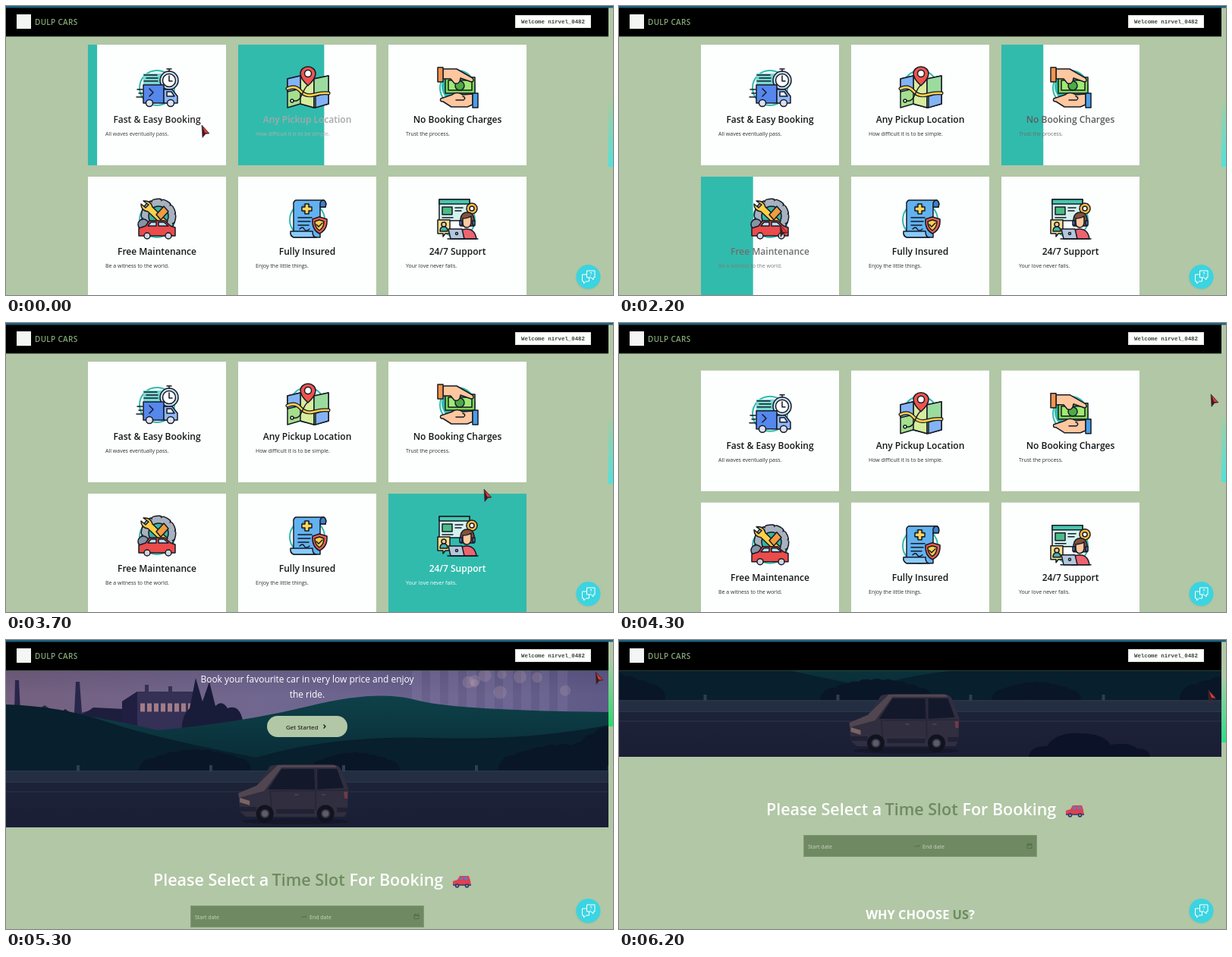
Write an HTML page that moves like this. It is 800x381 px and loops after 6.3 s.

```html
<!DOCTYPE html>
<html lang="en">
<head>
<meta charset="utf-8">
<title>Car rental page</title>
<style>
html, body { margin: 0; width: 100%; height: 100%; overflow: hidden; background: #b1c7a5; }
svg { display: block; }
text { font-family: "Open Sans", "Noto Sans", sans-serif; white-space: pre; }
.heading { font-size: 21.5px; font-weight: 600; }
.why { font-size: 16.4px; font-weight: 700; }
.title { font-size: 12px; font-weight: 600; text-anchor: middle; }
.small { font-size: 7px; }
.icon { stroke: #161a24; stroke-width: 1.5; stroke-linejoin: round; stroke-linecap: round; }
</style>
</head>
<body>
<svg id="stage" width="800" height="381" viewBox="0 0 800 381">
  <defs>
    <linearGradient id="sky"><stop stop-color="#75607f"/><stop offset=".45" stop-color="#706790"/><stop offset="1" stop-color="#5f5a87"/></linearGradient>
    <linearGradient id="dusk" x2="0" y2="1"><stop stop-color="#1e1c40"/><stop offset="1" stop-color="#1e1c40" stop-opacity="0"/></linearGradient>
    <linearGradient id="hill" x2="0" y2="1"><stop stop-color="#0e4149"/><stop offset="1" stop-color="#082833"/></linearGradient>
    <linearGradient id="road" x2="0" y2="1"><stop stop-color="#1c2437"/><stop offset="1" stop-color="#1b1e36"/></linearGradient>
    <linearGradient id="thumbFill" x2="0" y2="1"><stop stop-color="#a4cda3"/><stop id="thumbEnd" offset="1"/></linearGradient>
    <clipPath id="bannerClip"><path d="M0-260H794V154H0z"/></clipPath>
  </defs>
  <rect width="800" height="381" fill="#b1c7a5"/>

  <g id="page">
    <g clip-path="url(#bannerClip)">
      <rect y="-260" width="794" height="340" fill="url(#sky)"/>
      <rect y="-260" width="794" height="240" fill="url(#dusk)"/>
      <g id="bokeh"></g>
      <g id="town">
        <path d="M-40 40V2H8l1-42h5l2 42h18l14-9 14 10h25l2-41h5l3 41 16-5 20 7V40z" fill="#28264a"/>
        <path d="M60 35V10l15-12 17 12 20-14 40 2V35z" fill="#1d1e3d"/>
        <path d="M150 35v-47l20-13h10v-9h5v9h26v-7h5v7h34v55z" fill="#343056"/>
        <path d="M150-12l20-13v55h-20z" fill="#211f41"/>
        <path d="M174-4h74" stroke="#a17c87" stroke-width="11" stroke-dasharray="6 3"/>
      </g>
      <path d="M232 30q-2-22 10-33l8-40 9 31 9-26 8 32q9-9 16 3 14-5 19 12l6 21z" fill="#191c38"/>
      <path d="M0 85V-5Q90 0 200 26 310 16 400-6T540-14T800 2V85z" fill="url(#hill)"/>
      <path d="M0 85V-8Q70-6 130 14T290 54L330 62Q430 32 560 36T800 18V85z" fill="#081f2d"/>
      <g id="trees" fill="#091627"></g>
      <rect y="79" width="794" height="75" fill="url(#road)"/>
      <rect y="79" width="794" height="16" fill="#232e42"/>
      <path d="M0 80H794M0 94.500H794" stroke="#2c374b"/>
      <path d="M0 107H794" stroke="#252a41" stroke-width="2"/>
      <path id="posts" stroke="#303d50" stroke-width="8" stroke-dasharray="4 171"/>
      <g id="car">
        <ellipse cx="383" cy="146" rx="70" ry="4" fill="#141829"/>
        <path d="M350 73q7-2 20-2h60q10 0 13 6l10 26-1 29-4 8H318l-8-7-2-23 25-11z" fill="#302e3f"/>
        <path d="M360 72l-28 27-24 10 1 6 33-9 23-31h73l-3-3z" fill="#514650"/>
        <path d="M365 77h43l1 27h-62zM412 77h26l9 25-35 2z" fill="#14182b"/>
        <path d="M410 76v56M350 106l2 24M349 106l102-1" stroke="#262638" stroke-width="1.500"/>
        <path d="M310 115l13 4v6l-13-4z" fill="#7c6364"/>
        <path d="M447 107h5v9h-4z" fill="#713a46"/>
        <path d="M310 130h22M358 133h50M438 131h14" stroke="#202134" stroke-width="6"/>
        <path d="M382 111h5M418 111h5" stroke="#5c5461"/>
        <g fill="#11131f" stroke="#11131f" stroke-width="5">
          <circle cx="343" cy="136" r="9"/><circle cx="423" cy="136" r="9"/>
        </g>
        <g fill="#5f5c68" stroke="#353647" stroke-width="2">
          <circle cx="343" cy="136" r="5"/><circle cx="423" cy="136" r="5"/>
        </g>
      </g>
      <path id="bush" d="M0 154q2-15 24-14 12-19 44-17 30 0 40 15 24-4 35 5 16 0 17 11z" fill="#0c1329"/>
      <g fill="#fff" text-anchor="middle" font-size="11.950">
        <text x="397" y="-37">Book your favourite car in very low price and enjoy</text>
        <text x="397" y="-17">the ride.</text>
      </g>
      <rect x="344" y="7" width="106" height="28" rx="14" fill="#b1c7a5"/>
      <text x="369" y="24.500" font-size="8">Get Started</text>
      <path d="M418.500 18.500l2.500 2.500-2.500 2.500" fill="none" stroke="#111" stroke-width="1.200"/>
    </g>

    <g class="heading" fill="#fff">
      <text x="194" y="231">Please Select a</text>
      <text x="350.500" y="231" fill="#6f8a62">Time Slot</text>
      <text x="452.500" y="231">For Booking</text>
    </g>
    <path d="M589 225l6-2 3-5h12l2 6 1 7h-24z" fill="#df4052"/>
    <path d="M597 223l2-3.500h3v3.500zm7-3.500h4l1 3.500h-5z" fill="#557fc4"/>
    <path d="M589 229h24v2h-24z" fill="#5a456f"/>
    <g fill="#8c9cc0" stroke="#293760" stroke-width="1.500"><circle cx="594.500" cy="231" r="2"/><circle cx="607.500" cy="231" r="2"/></g>
    <rect x="243.500" y="257.500" width="307" height="28" fill="#6f8a62" stroke="#819a74"/>
    <g class="small" fill="#c9d6c1"><text x="249" y="274.500">Start date</text><text x="400" y="274.500">End date</text></g>
    <path d="M389 272h7l-2-2M538 269h6v5.500h-6zM538 270.500h6M539.500 267.500v2M542.500 267.500v2" fill="none" stroke="#4f6745" stroke-width=".8"/>
    <text class="why" x="397" y="368" text-anchor="middle" fill="#fff">WHY CHOOSE <tspan fill="#6f8a62">US</tspan>?</text>
    <g id="cards" transform="translate(0 341)"></g>
  </g>

  <rect x="794" width="6" height="381" fill="#b1c7a5"/>
  <rect id="thumb" x="794" width="6" height="85" fill="url(#thumbFill)"/>
  <rect y="2" width="794" height="38" fill="#000"/>
  <path d="M0 40.300H794" stroke="#3e5a35" stroke-width=".6"/>
  <rect width="800" height="2.500" fill="#1c617f"/>
  <rect x="14" y="11" width="19" height="19" fill="#f4f6f3"/>
  <text x="38" y="24.500" font-size="10" font-weight="600" letter-spacing=".3" fill="#86a878">DULP CARS</text>
  <rect x="671.500" y="12.500" width="99" height="16" fill="#fff" stroke="#dfe6db"/>
  <text x="679" y="23" font-size="7.370" font-weight="700" fill="#354535" style="font-family:'Liberation Mono',monospace">Welcome nirvel_0482</text>

  <circle cx="767" cy="358" r="16.500" fill="#789f91" opacity=".2"/>
  <circle cx="767.500" cy="357" r="16" fill="#3bd4e1"/>
  <g fill="#3bd4e1" stroke="#fff" stroke-linejoin="round">
    <path d="M759.500 354h9v9h-4l-3 3v-3h-2z"/>
    <path d="M765.500 349h10.500v9h-2v3l-3-3h-5.500z"/>
  </g>
  <path d="M769.500 352q2-2 2.500 0 0 1-1.500 2m0 1.500v.8" fill="none" stroke="#fff" stroke-width=".8"/>

  <g id="cursor">
    <path d="M0 0L10 11 5 11.500 1 16.500z" fill="#351d22" stroke="#503039" stroke-width=".7"/>
    <path d="M1 2l8 8.500-5-.5z" fill="#e83a36"/>
  </g>
</svg>

<script>
const LOOP = 6300, TRANSITION = 500;
const $ = id => document.getElementById(id);
const ring = '<circle cx="27" cy="28" r="23" fill="none" stroke="#31bbad" stroke-width="2"/>';

const icons = {
  truck: `<path d="M9 24V9h25v15" fill="#78d8d2" stroke="none"/><path d="M10 11h17M13 15h15M10 19h18"/>
    <circle cx="43" cy="18" r="12" fill="#c6dff4"/><circle cx="43" cy="18" r="8.500" fill="#fff"/><path d="M43 12v7h4M40 3h6M43 3v3"/>
    <path d="M9 24h27v24H9z" fill="#5687ed"/><path d="M36 30h11l7 9v9H36z" fill="#8fb8fa"/><path d="M40 33h6l4 6H40z" fill="#e4f0ff"/>
    <path d="M17 29l5 5-5 5M1 30h7M3 35h5M0 40h8" fill="none"/>
    <circle cx="17" cy="48" r="4.500" fill="#dce3ee"/><circle cx="45" cy="48" r="4.500" fill="#dce3ee"/>`,
  map: `<path d="M1 16l17-4 18 4 19-4v37l-19 5-18-5-17 5z" fill="#a5df8c"/><path d="M18 12l18 4v38l-18-5z" fill="#d7ec9d"/>
    <path d="M36 16l19-4v37l-19 5z" fill="#9bdc9e"/><path d="M1 16l17-4v17L1 33zM38 39l17-5v15l-17 5z" fill="#84b3f5"/>
    <path d="M1 29q10-5 17 3t18 5 19-2" fill="none" stroke-width="5"/><path d="M1 29q10-5 17 3t18 5 19-2" fill="none" stroke="#ffd04c" stroke-width="2.600"/>
    <path d="M8 45q8 2 12-8t9-14" fill="none"/><circle cx="7" cy="45" r="2" fill="#fff"/>
    <path d="M28 25q-10-9-10-16a10 9 0 0 1 20 0q0 7-10 16z" fill="#ef5350"/><circle cx="28" cy="9" r="4.500" fill="#fff"/>`,
  money: `<circle cx="27" cy="26" r="21" fill="#31bbad" stroke="none"/>
    <path d="M11 14h39v21H11z" fill="#83d657"/><path d="M15 18h31v13H15z" fill="#a0e974"/><circle cx="30" cy="25" r="6" fill="#4dab48"/>
    <path d="M8 3h18l21 12q3 5-2 5L31 15q-1 9-8 7l-5-6H8z" fill="#ffc79f"/><path d="M1 1h7v19H1z" fill="#f7954e"/>
    <path d="M47 36l-13 1q-8-5-14 0L5 42q-2 4 3 4l11 7h21l7-3z" fill="#ffc79f"/><path d="M25 44h10q4-3-1-5" fill="none"/><path d="M47 35h7v19h-7z" fill="#4a9ee8"/>`,
  service: `<circle cx="29" cy="23" r="19" fill="none" stroke-width="9" stroke-dasharray="7 4.940"/>
    <circle cx="29" cy="23" r="19" fill="#a8b1bf" stroke="#a8b1bf" stroke-width="6" stroke-dasharray="6 5.940"/><circle cx="29" cy="23" r="13" fill="#36b5a6"/>
    <path d="M9 3q10-1 12 8l20 19-6 6-20-19Q6 16 6 7l6 5 4-4z" fill="#ffcf47"/><path d="M26 21l10-11 6 7-10 11z" fill="#f29b40"/>
    <circle cx="9" cy="34" r="7" fill="#8793a6"/><path d="M3 39l9-3 5-7h20l8 7 6 2v11H3z" fill="#eb4b4b"/><path d="M15 36l4-5h7v5zM29 31h7l6 5H29z" fill="#b8def4"/>
    <circle cx="14" cy="49" r="4" fill="#d0d6e1"/><circle cx="42" cy="49" r="4" fill="#d0d6e1"/>`,
  insured: `<path d="M12 2h37q4 3 2 9h-7v40H9V9q-1-5 3-7z" fill="#63b2f0"/><path d="M44 11V6q1-4 5-4 4 3 2 9z" fill="#3d82c9"/>
    <path d="M5 43h29q0 8 5 8H9q-5-2-4-8z" fill="#8acbfa"/><circle cx="26" cy="13" r="7" fill="#4391da" stroke="none"/>
    <path d="M24 7h5v4h4v5h-4v4h-5v-4h-4v-5h4z" fill="#ffd55a"/><path d="M15 25h18M15 30h16M15 35h14M17 40q4-4 6 0t7 0" fill="none"/>
    <path d="M43 24l10 3q1 14-10 19-10-5-9-19z" fill="#ed6053"/><path d="M43 28l6 2q0 8-6 12-6-4-6-12z" fill="#ffcf4a"/><path d="M39 34l3 3 5-5" fill="none"/>`,
  support: `<path d="M3 1h40v28H3z" fill="#d4f2ef"/><path d="M3 1h40v6H3z" fill="#47c7ae"/><path d="M7 11h13v10H7z" fill="#4dbb86"/><path d="M24 12h10M24 16h8M7 25h14"/>
    <circle cx="46" cy="13" r="7" fill="#ffbd45" stroke-dasharray="3 1"/><circle cx="46" cy="13" r="3" fill="#fff"/>
    <path d="M1 28h16v18h-6l-3 4v-4H1z" fill="#f6df89"/><circle cx="9" cy="34" r="3" fill="#ffc79f"/><path d="M4 43q0-6 5-6t5 6z" fill="#43b6a8"/>
    <path d="M28 53q0-13 11-13t13 13z" fill="#ed6470"/><path d="M31 36V27q1-9 9-9t9 9v9z" fill="#85513c"/>
    <path d="M34 26q7 0 11-3v9q-1 6-6 6t-5-7z" fill="#ffc79f"/><path d="M30 29h3v6h-3zM47 29h3v6h-3z" fill="#4f7ccf"/>
    <path d="M15 40h18l3 13H18z" fill="#b3c6dc"/><path d="M14 53h40"/><circle cx="26" cy="46" r="1.500" fill="#fff"/>`
};

// hover: [enter, leave] times in ms
const cards = [
  { icon: 'truck', title: 'Fast & Easy Booking', note: 'All waves eventually pass.', hover: [[-40, 600]] },
  { icon: 'map', title: 'Any Pickup Location', note: 'How difficult it is to be simple.', hover: [[-900, -118], [650, 1310]] },
  { icon: 'money', title: 'No Booking Charges', note: 'Trust the process.', hover: [[1330, 1995]] },
  { icon: 'service', title: 'Free Maintenance', note: 'Be a witness to the world.', hover: [[2082, 2650]] },
  { icon: 'insured', title: 'Fully Insured', note: 'Enjoy the little things.', hover: [[2700, 3150]] },
  { icon: 'support', title: '24/7 Support', note: 'Your love never fails.', hover: [[3200, 3720]] }
];
$('cards').innerHTML = cards.map((card, i) => `
  <g transform="translate(${108 + i % 3 * 198} ${51 + (i > 2) * 174})">
    <rect width="182" height="159" fill="#fdfefe"/>
    <rect class="fill" height="159" fill="#31bbad"/>
    <g class="icon" fill="none" transform="translate(64 29)">${ring}${icons[card.icon]}</g>
    <text class="title" x="91" y="103">${card.title.replace('&', '&amp;')}</text>
    <text class="small" x="23" y="120">${card.note}</text>
  </g>`).join('');
cards.forEach((card, i) => {
  const node = $('cards').children[i];
  card.fill = node.querySelector('.fill');
  card.titleNode = node.querySelector('.title');
  card.noteNode = node.querySelector('.small');
});

let seed = 7;
const random = () => (seed = seed * 16807 % 2147483647) / 2147483647;
const clump = (x, width, height) => Array.from({ length: 9 }, (_, i) => {
  const u = (i + .5) / 9, r = width / 9 + random() * 5;
  return `<circle cx="${x + width * u}" cy="${80 + r - height * (.5 + .5 * Math.sin(Math.PI * u))}" r="${r}"/>`;
}).join('');
$('trees').innerHTML = clump(-230, 130, 36) + clump(125, 130, 29) + clump(350, 100, 25) + clump(600, 150, 36) + clump(690, 150, 66);
$('bokeh').innerHTML = Array.from({ length: 9 }, (_, i) =>
  `<rect x="${535 + i * 24}" y="${-110 + random() * 40}" width="13" height="130" fill="#a79ac0" opacity=".15"/>
   <circle cx="${530 + random() * 240}" cy="${-55 + random() * 45}" r="${4 + random() * 5}" fill="#d3b0b4" opacity=".2"/>`).join('');

// CSS "ease": cubic-bezier(.25, .1, .25, 1)
function ease(x) {
  if (x <= 0) return 0;
  if (x >= 1) return 1;
  let lo = 0, hi = 1, s;
  for (let i = 0; i < 20; i++) {
    s = (lo + hi) / 2;
    if (.75 * s * (1 - s) + s ** 3 < x) lo = s; else hi = s;
  }
  return .3 * s * (1 - s) ** 2 + 3 * s * s * (1 - s) + s ** 3;
}

// keys: [time, ...values]
function track(keys, t) {
  const i = Math.max(1, keys.findIndex(key => key[0] >= t));
  const [a, b] = [keys[i - 1], keys[i]], u = (t - a[0]) / (b[0] - a[0]);
  return a.slice(1).map((v, k) => v + (b[k + 1] - v) * u * u * (3 - 2 * u));
}
const scrollKeys = [[0, -341], [4250, -341], [4700, 0], [4950, 0], [5300, 93], [5600, 93], [6000, 0], [LOOP, 0]];
const cursorKeys = [[0, 258, 157], [300, 205, 150], [900, 400, 142], [1300, 519, 139], [1800, 600, 145],
  [2200, 212, 288], [2900, 395, 290], [3400, 590, 285], [3700, 630, 219], [4250, 780, 95],
  [4700, 780, 62], [5300, 777, 42], [6200, 777, 66], [LOOP, 777, 66]];

const move = (id, x, y = 0) => $(id).setAttribute('transform', `translate(${x} ${y})`);
const gray = (from, amount) => `rgb(${Array(3).fill(Math.round(from + (255 - from) * amount))})`;

function draw(t) {
  for (const card of cards) {
    const amount = card.hover.reduce((sum, [enter, leave]) =>
      sum + ease((t - enter) / TRANSITION) - ease((t - leave) / TRANSITION), 0);
    card.fill.setAttribute('width', 182 * amount);
    card.titleNode.setAttribute('fill', gray(22, amount));
    card.noteNode.setAttribute('fill', gray(45, amount));
  }
  const [scroll] = track(scrollKeys, t), drive = t - 4700;
  move('page', 0, scroll);
  move('cursor', ...track(cursorKeys, t));
  move('town', drive * .005);
  move('trees', drive * .1);
  move('car', drive * -.003);
  move('bush', 540 + (t - 6200) * .85);
  const firstPost = ((139 + drive * .215) % 175 + 175) % 175 - 175;
  $('posts').setAttribute('d', `M${firstPost} 76H794`);
  $('thumb').setAttribute('y', 50 - scroll * .226);
  $('thumbEnd').setAttribute('stop-color', `hsl(${150 - scroll * .082} 72% ${53 - scroll * .02}%)`);
}

function tick() {
  // the picture advances ten times a second
  draw(Math.floor(performance.now() % LOOP / 100) * 100);
  requestAnimationFrame(tick);
}
tick();
</script>
</body>
</html>
```
